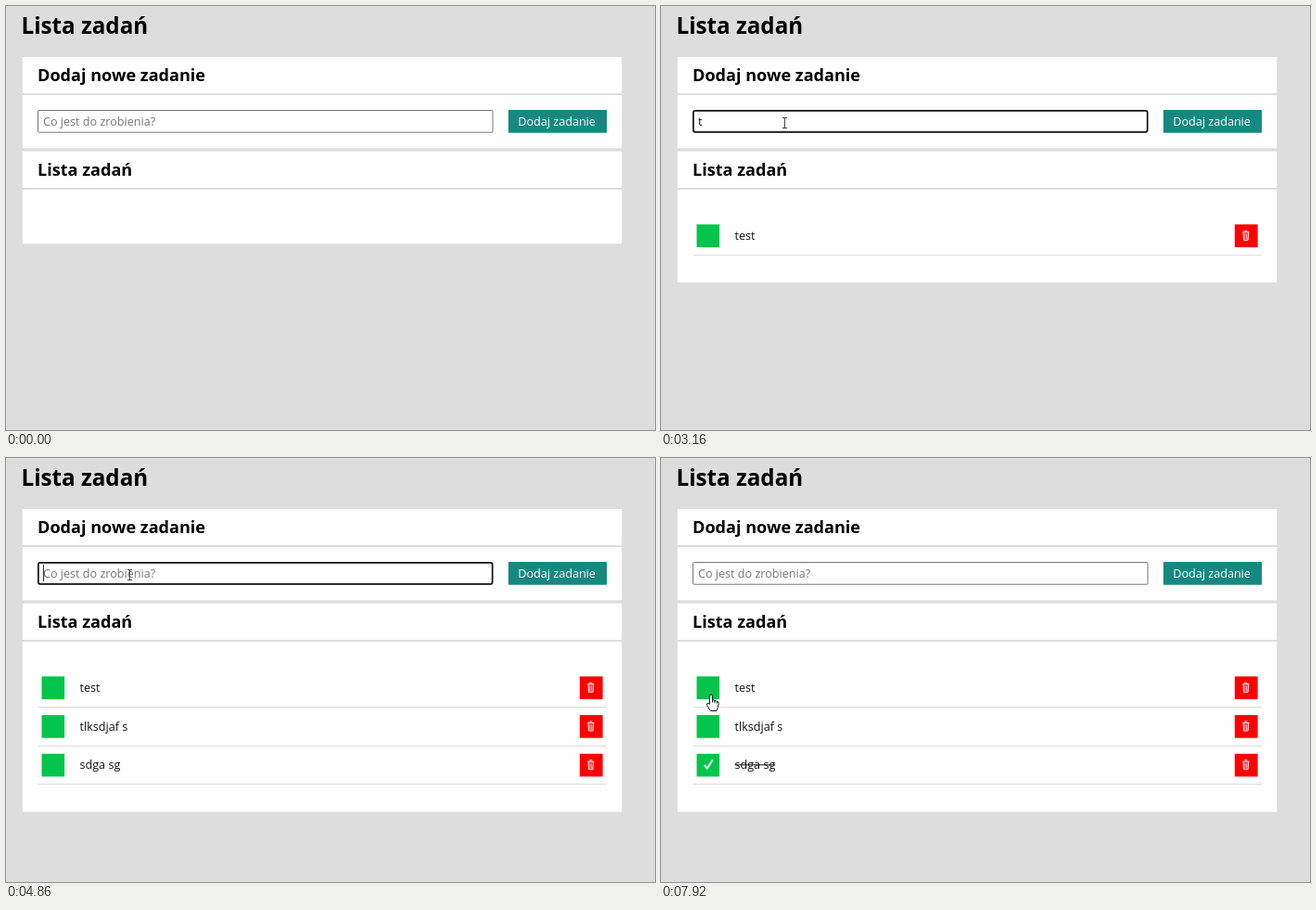
Write an HTML page with a canvas that moves like this. It is 700 px wide and 457 px high and loops after 7990 ms.

```html
<!DOCTYPE html>
<html lang="pl">
<head>
<meta charset="utf-8">
<title>Lista zadań</title>
<style>
  html, body { margin: 0; width: 100%; height: 100%; overflow: hidden; background: #ddd; }
  canvas { display: block; }
</style>
</head>
<body>
<canvas id="stage" width="700" height="457"></canvas>
<script>
const ctx = document.getElementById('stage').getContext('2d');
const LOOP = 7990, TICK = 70, BLINK = 530, ROW = 41.7;
const FOCUS = 820, BLUR = 6480, CHECKED = 6550;
const BODY = '500 12.6px "Open Sans", sans-serif';
const TITLE = 'bold 24.2px "Open Sans", sans-serif';
const HEADING = 'bold 18.1px "Open Sans", sans-serif';

// Each burst types its text evenly from the first time to the second.
const tasks = [
  { added: 1820, bursts: [[1020, 1620, 'test']] },
  { added: 3910, bursts: [[2610, 2610, 't'], [3230, 3510, 'lksdjaf'], [3710, 3840, ' s']] },
  { added: 4860, bursts: [[4310, 4380, 'sdga'], [4590, 4660, ' sg']] }
];
for (const task of tasks) {
  task.keys = task.bursts.flatMap(([start, end, text]) =>
    [...text].map((char, i) => ({ char, time: start + (end - start) * i / Math.max(1, text.length - 1) })));
}

const linear = p => p;
const easeOut = p => 1 - (1 - p) ** 2;

// Pointer moves along quadratic curves: start, bend, finish.
const moves = [
  { from: 130, to: 820, ease: easeOut, curve: [[440, 366], [150, 160], [133, 126]] },
  { from: 5720, to: 6280, ease: easeOut, curve: [[133, 126], [50, 400], [49, 330]] },
  { from: 6880, to: 7640, ease: linear, curve: [[49, 330], [163, 310], [49, 288]] },
  { from: 7710, to: 7920, ease: linear, curve: [[49, 288], [51, 272], [54, 254.5]] }
];

const arrow = new Path2D('M0 0V15.5L3.6 12.2L6 18L8.6 16.9L6.2 11.3H11Z');
const hand = new Path2D('M-1.6 1.6Q0-.8 1.6 1.6V6.6Q3 5.6 4 7.2Q5.4 6.4 6.2 8Q8.4 7.6 8.2 10.2L7.4 14L6 18H-.6L-4.4 12Q-5.2 9.8-3 9.6L-1.6 11Z');
const fingers = new Path2D('M1.6 6.6V9M4 7.2V9.4M6.2 8V10');

const rowTop = i => 235.4 + i * ROW;

function box(x, y, w, h, color) {
  ctx.fillStyle = color;
  ctx.fillRect(x, y, w, h);
}

function label(text, x, y, font, color = '#000') {
  ctx.font = font;
  ctx.fillStyle = color;
  ctx.fillText(text, x, y);
}

function line(points, color, width) {
  ctx.strokeStyle = color;
  ctx.lineWidth = width;
  ctx.beginPath();
  points.forEach(p => ctx.lineTo(...p));
  ctx.stroke();
}

function pointerAt(t) {
  const move = moves.findLast(m => m.from <= t);
  if (!move) return null;
  const steps = Math.round((move.to - move.from) / TICK) + 1;
  const u = move.ease(Math.min(1, (Math.floor((t - move.from) / TICK) + 1) / steps));
  const [a, b, c] = move.curve;
  return a.map((v, i) => v * (1 - u) ** 2 + 2 * b[i] * u * (1 - u) + c[i] * u * u);
}

function drawPointer([x, y], rows) {
  const inside = (l, top, r, b) => x > l && x < r && y > top && y < b;
  ctx.save();
  ctx.translate(x, y);
  if (inside(34, 112, 525, 137)) {
    line([[.5, -5], [.5, 5]], '#444', 1);
    for (const end of [-5.5, 5.5]) line([[-2, end], [3, end]], '#444', 1);
  } else {
    const overBox = rows.some((_, i) => inside(38, rowTop(i), 63, rowTop(i) + 24.5));
    const shape = overBox ? hand : arrow;
    ctx.fillStyle = '#fff';
    ctx.strokeStyle = '#111';
    ctx.lineWidth = 1;
    ctx.fill(shape);
    ctx.stroke(shape);
    if (overBox) ctx.stroke(fingers);
  }
  ctx.restore();
}

function drawTrash(x, y) {
  line([[x - 3.6, y - 3.5], [x + 3.6, y - 3.5]], '#fff', 1.1);
  line([[x - 1.5, y - 5], [x + 1.5, y - 5]], '#fff', 1);
  line([[x - 2.7, y - 3], [x - 2.3, y + 5], [x + 2.3, y + 5], [x + 2.7, y - 3]], '#fff', 1);
  for (const dx of [-.9, .9]) line([[x + dx, y - 2], [x + dx, y + 4]], '#fff', .8);
}

function drawTask({ keys }, i, done) {
  const y = rowTop(i);
  const text = keys.map(k => k.char).join('');
  box(38.5, y, 24.6, 24.6, '#03c54b');
  label(text, 79.5, y + 16.4, BODY, '#111');
  box(618.8, y, 24.8, 24.6, '#f00');
  drawTrash(630.8, y + 11.9);
  box(34.5, Math.round(y + 32.6), 613.5, 1, '#ddd');
  if (!done) return;
  line([[46.8, y + 12], [49.8, y + 15.8], [55.8, y + 6.5]], '#fff', 2);
  line([[79.5, y + 12], [79.5 + ctx.measureText(text).width, y + 12]], '#111', 1);
}

function drawInput(t) {
  const focused = t >= FOCUS && t < BLUR;
  const pressed = tasks.flatMap(task => task.keys).filter(k => k.time <= t);
  const current = tasks.find(task => task.added > t);
  const text = current ? current.keys.filter(k => k.time <= t).map(k => k.char).join('') : '';

  const width = focused ? 1.7 : 1;
  ctx.strokeStyle = focused ? '#101010' : '#767676';
  ctx.lineWidth = width;
  ctx.beginPath();
  ctx.roundRect(34 + width / 2, 112 + width / 2, 491.5 - width, 24.7 - width, focused ? 2 : 1);
  ctx.stroke();
  label(text || 'Co jest do zrobienia?', 40, 128.8, BODY, text ? '#111' : '#7b7575');

  // The caret blinks from the latest key press.
  const lastKey = pressed.length ? pressed.at(-1).time : FOCUS;
  const caret = (t - lastKey) % (2 * BLINK) < BLINK;
  if (focused && caret) box(40 + Math.round(text && ctx.measureText(text).width), 115, 1, 18, '#333');
}

function draw(t) {
  const rows = tasks.filter(task => task.added <= t);
  box(0, 0, 700, 457, '#ddd');
  label('Lista zadań', 16.5, 29.5, TITLE);

  const panels = [[55, 39], [96, 57.3], [156.7, 39.3], [198, 58.3 + rows.length * ROW]];
  for (const [y, h] of panels) box(17.8, y, 646.4, h, '#fff');
  label('Dodaj nowe zadanie', 34, 81, HEADING);
  label('Lista zadań', 34, 183, HEADING);

  drawInput(t);
  box(541.8, 112, 106.2, 24.7, '#178880');
  label('Dodaj zadanie', 552.3, 128.8, BODY, '#fff');

  rows.forEach((task, i) => drawTask(task, i, i === 2 && t >= CHECKED));
  const pointer = pointerAt(t);
  if (pointer) drawPointer(pointer, rows);
}

const begin = performance.now();
function tick() {
  draw((performance.now() - begin) % LOOP);
  requestAnimationFrame(tick);
}
tick();
</script>
</body>
</html>
```
